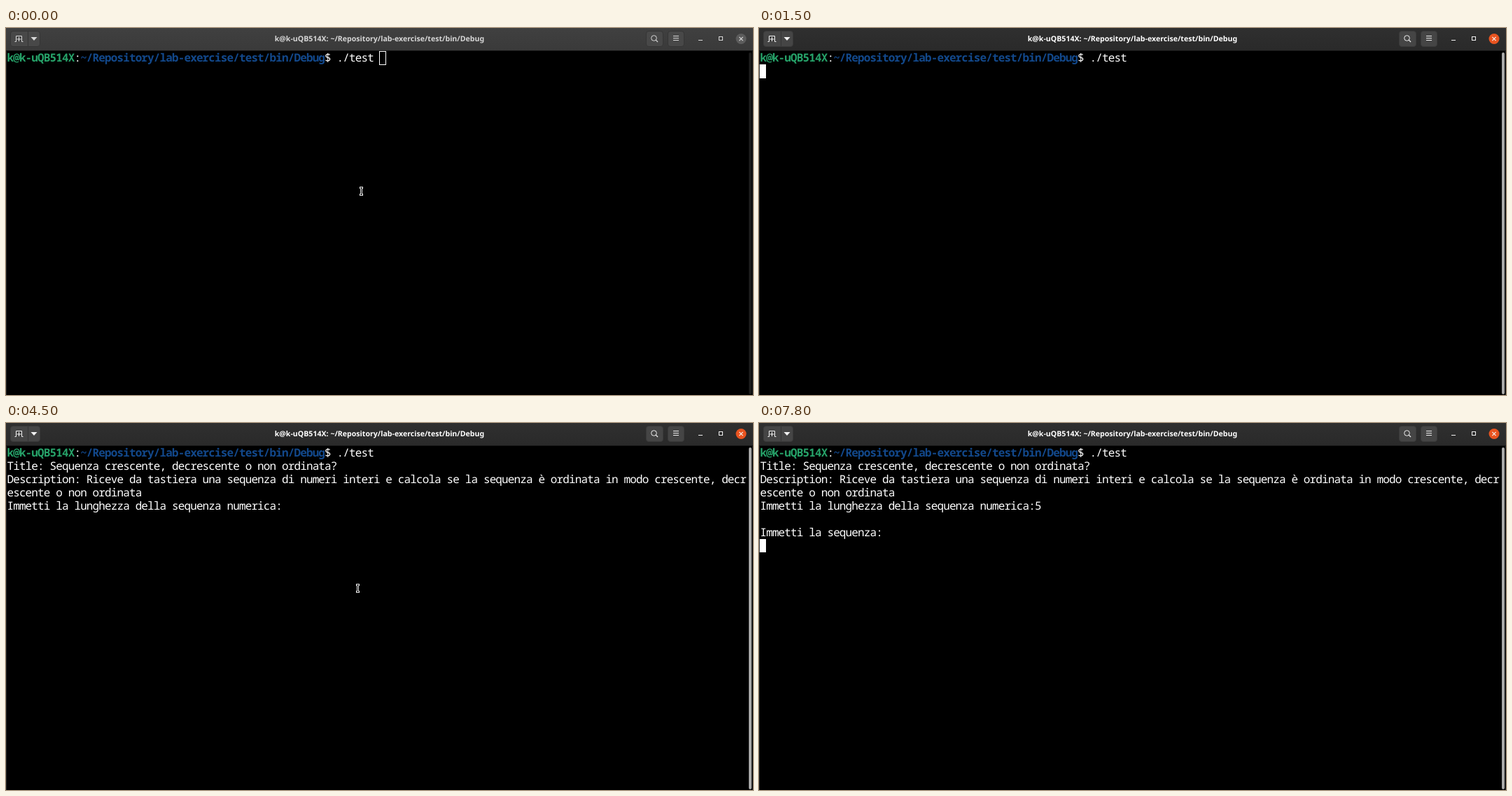
Animation of 1067 by 525 pixels, one loop 8000 ms. Source, as an HTML page:

```html
<!DOCTYPE html>
<html lang="it">
<head>
<meta charset="utf-8">
<title>Terminal</title>
<style>
  html, body { margin: 0; width: 100%; height: 100%; overflow: hidden; background: #000; }
  svg { display: block; width: 1067px; height: 525px; }
  text { white-space: pre; text-rendering: geometricPrecision; }
  #screen text {
    font: 500 16px "Noto Sans Mono", "DejaVu Sans Mono", monospace;
    letter-spacing: calc(8.724px - 1ch);
    fill: #fff;
  }
  #screen .user { font-weight: 700; fill: #26a269; }
  #screen .path { font-weight: 700; fill: #12488b; }

  .title { font: 700 10.6px "Noto Sans", "Open Sans", sans-serif; text-anchor: middle; fill: #fff; }
  .bar { fill: url(#active); }
  .button { fill: #454545; stroke: #3a3a3a; }
  .icon { fill: none; stroke: #f2f2f2; }
  .solid { fill: #f2f2f2; }
  .close { fill: #e95420; }
  .thumb { fill: #a9a9a9; }

  .backdrop .bar { fill: url(#inactive); }
  .backdrop .title { fill: #d6d6d6; }
  .backdrop .button { fill: #484848; stroke: #353535; }
  .backdrop .icon { stroke: #d8d8d8; }
  .backdrop .solid { fill: #d8d8d8; }
  .backdrop .close { fill: #5c5c5c; }
  .backdrop .thumb { fill: #1b1b1b; }
</style>
</head>
<body>
<svg id="window" viewBox="0 0 1067 525">
  <defs>
    <linearGradient id="active" x2="0" y2="1">
      <stop stop-color="#2f2f2f"/><stop offset="1" stop-color="#2a2a2a"/>
    </linearGradient>
    <linearGradient id="inactive" x2="0" y2="1">
      <stop stop-color="#404040"/><stop offset="1" stop-color="#3a3a3a"/>
    </linearGradient>
  </defs>

  <rect width="1067" height="525"/>
  <path d="M.5 32V525M1066.5 32V525" stroke="#262626"/>
  <rect class="thumb" x="1061" y="35" width="4" height="489" rx="2"/>

  <g id="header">
    <rect class="bar" width="1067" height="32"/>
    <path d="M0 32.5H1067" stroke="#161616"/>
    <rect class="button" x="6.5" y="4.5" width="42" height="22" rx="3.5"/>
    <path d="M31.5 5V26" stroke="#343434"/>
    <path class="icon" d="M12.5 19.5H14.5V11.5H22.5V19.5H24.5M18.5 13V19M15.5 16H21.5"/>
    <path class="solid" d="M35.5 13H44.5L40 18Z"/>
    <text class="title" x="533.5" y="19">k@k-uQB514X: ~/Repository/lab-exercise/test/bin/Debug</text>
    <rect class="button" x="914.5" y="4.5" width="24" height="22" rx="3.5"/>
    <circle class="icon" cx="925.5" cy="14.5" r="3.8"/>
    <path class="icon" d="M928.2 17.2L931 20" stroke-width="1.2"/>
    <rect class="button" x="945.5" y="4.5" width="23" height="22" rx="3.5"/>
    <path class="icon" d="M953 11.5H961M953 14.5H961M953 17.5H961"/>
    <path class="icon" d="M989 17.5H995"/>
    <rect class="icon" x="1018.5" y="12.5" width="5" height="5"/>
    <circle class="close" cx="1050" cy="15.5" r="7.5"/>
    <path class="icon" d="M1047.4 12.9L1052.6 18.1M1052.6 12.9L1047.4 18.1" stroke-width="1.2"/>
  </g>

  <g id="screen"></g>
  <rect id="caret" width="9"/>
  <g id="mouse" fill="none">
    <path d="M-2.5 -5H2.5M0 -5V5M-2.5 5H2.5" stroke="#e8e8e8" stroke-width="3"/>
    <path d="M-1.5 -5H1.5M0 -5V5M-1.5 5H1.5" stroke="#000"/>
  </g>
</svg>

<script>
const LOOP = 8000, LEFT = 1.45, TOP = 33.2, CELL = 8.724, ROW = 18.9;
const byId = id => document.getElementById(id);
const caret = byId('caret'), mouse = byId('mouse');

const user = 'k@k-uQB514X', path = '~/Repository/lab-exercise/test/bin/Debug';
const question = 'Immetti la lunghezza della sequenza numerica:';

// Each run of text: row, column, words, class, time it appears.
const runs = [
  [0, 0, user, 'user', 0],
  [0, 11, ':', '', 0],
  [0, 12, path, 'path', 0],
  [0, 52, '$ ./test', '', 0],
  [1, 0, 'Title: Sequenza crescente, decrescente o non ordinata?', '', 1600],
  [2, 0, 'Description: Riceve da tastiera una sequenza di numeri interi e calcola se la sequenza è ordinata in modo crescente, decr', '', 1600],
  [3, 0, 'escente o non ordinata', '', 1600],
  [4, 0, question, '', 1600],
  [4, question.length, '5', '', 6800],
  [6, 0, 'Immetti la sequenza:', '', 6800]
].map(([row, col, words, cls, from]) => {
  const el = document.createElementNS('http://www.w3.org/2000/svg', 'text');
  el.setAttribute('x', LEFT + col * CELL);
  el.setAttribute('y', TOP + 15.1 + row * ROW);
  el.setAttribute('class', cls);
  el.textContent = words;
  byId('screen').append(el);
  return { el, from };
});

const focusAt = 900;
const caretPlaces = [[0, 0, 61], [1500, 1, 0], [1600, 4, 45], [6800, 7, 0]];
const caretLooks = [
  [0, 'hollow'], [800, 'full'], [1300, 'off'], [1500, 'full'], [2100, 'off'],
  [2900, 'full'], [3200, 'off'], [4000, 'full'], [4500, 'off'], [5300, 'full'],
  [5800, 'off'], [6800, 'full'], [7400, 'off'], [7800, 'full']
];
const mousePlaces = [[0, 507.5, 233.5], [1500], [2100, 502.5, 236.5], [6800]];

const latest = (steps, t) => steps.filter(step => step[0] <= t).pop().slice(1);
const show = (el, on) => el.setAttribute('visibility', on ? 'visible' : 'hidden');

function drawCaret(t) {
  const [row, col] = latest(caretPlaces, t);
  const [look] = latest(caretLooks, t);
  const hollow = look === 'hollow';
  const y = TOP + row * ROW, top = Math.round(y), bottom = Math.round(y + 19.5);
  caret.setAttribute('x', Math.round(LEFT + col * CELL) - (hollow ? 0.5 : 0));
  caret.setAttribute('y', top + (hollow ? 0.5 : 0));
  caret.setAttribute('height', bottom - top - (hollow ? 1 : 0));
  caret.setAttribute('fill', hollow ? 'none' : '#fff');
  caret.setAttribute('stroke', hollow ? '#fff' : 'none');
  show(caret, look !== 'off');
}

function draw(t) {
  byId('window').classList.toggle('backdrop', t < focusAt);
  runs.forEach(({ el, from }) => show(el, t >= from));
  drawCaret(t);
  const [x, y] = latest(mousePlaces, t);
  show(mouse, x !== undefined);
  if (x !== undefined) mouse.setAttribute('transform', `translate(${x} ${y})`);
}

const start = performance.now();
function tick() {
  draw((performance.now() - start) % LOOP);
  requestAnimationFrame(tick);
}
tick();
</script>
</body>
</html>
```
